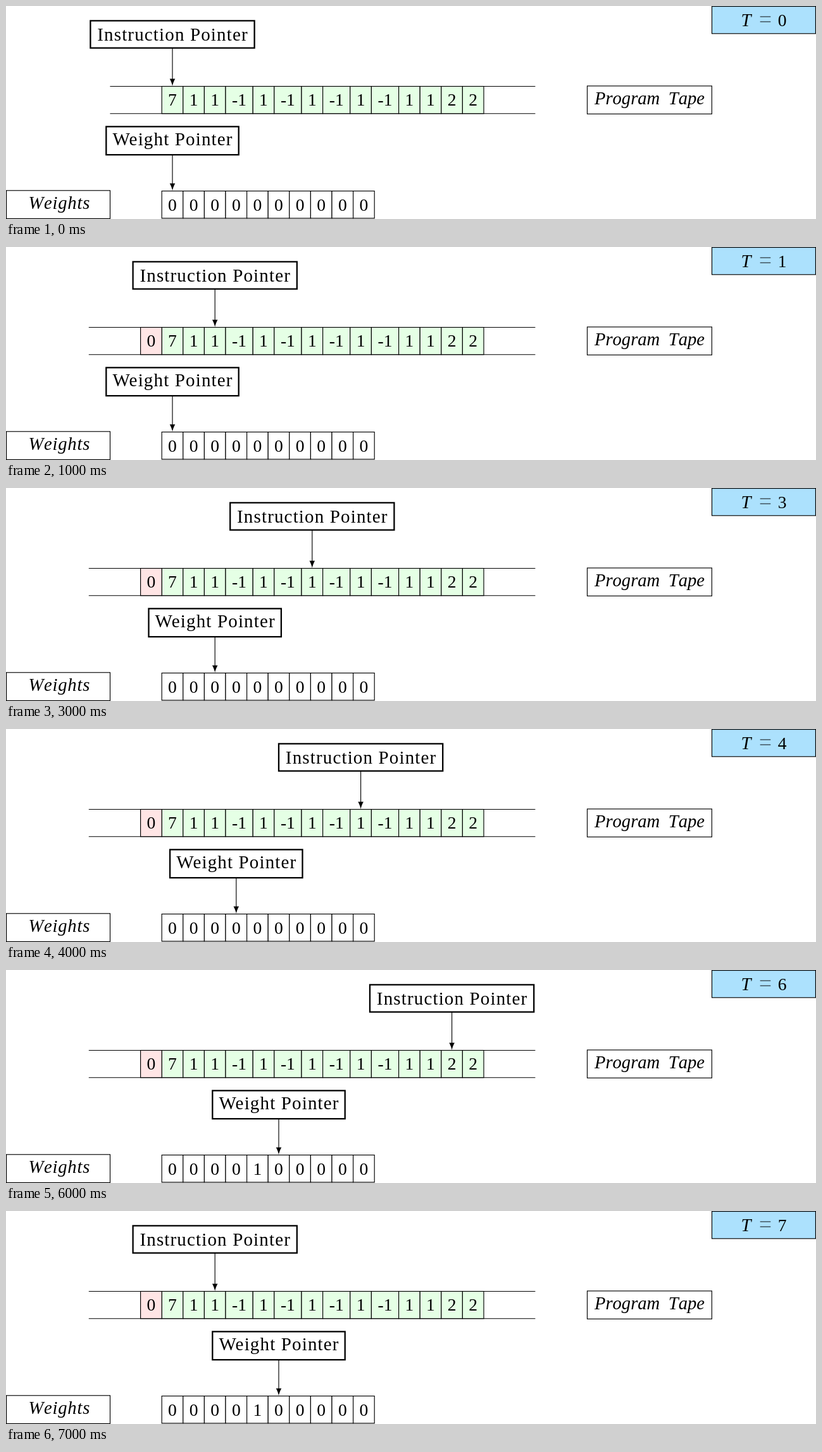
Write an HTML page that moves like this. It is 1280x338 px and loops after 8 s.

```html
<!DOCTYPE html>
<html lang="en">
<head>
<meta charset="utf-8">
<title>Program tape</title>
<style>
  html, body { margin: 0; width: 100%; height: 100%; overflow: hidden; background: #fff; }
  svg { display: block; width: 100vw; height: 100vh; }
  text { font: 27.6px "Liberation Serif", "Times New Roman", serif; text-anchor: middle; }
  .label { font-size: 29px; letter-spacing: 1.15px; }
  .it { font-size: 28.6px; font-style: italic; font-kerning: none; }
  .tape { word-spacing: 6.5px; }
  .weights { letter-spacing: 0.8px; }
  .equals { font-size: 38px; stroke: #ace1fd; stroke-width: 1px; }
  .box { stroke: #000; stroke-width: 1.15; }
  .thick { stroke: #000; stroke-width: 2.3; }
</style>
</head>
<body>
<svg id="stage" viewBox="0 0 1280 338"></svg>
<script>
const STEP = 1000, STEPS = 8;
const LEFT = 246.2, CELL = 33.6, WIDE = 43.2, HEIGHT = 43.2;
const TAPE_Y = 127.5, WEIGHTS_Y = 293.6;
const tape = [7, 1, 1, -1, 1, -1, 1, -1, 1, -1, 1, 1, 2, 2];
const stage = document.getElementById("stage");

function add(tag, attrs, parent = stage, content = "") {
  const el = document.createElementNS("http://www.w3.org/2000/svg", tag);
  for (const key in attrs) el.setAttribute(key, attrs[key]);
  el.textContent = content;
  parent.appendChild(el);
  return el;
}

const box = (x, y, width, height, fill = "#fff", parent = stage, cls = "box") =>
  add("rect", { x, y, width, height, fill, class: cls }, parent);

const label = (x, y, content, cls = "", parent = stage) =>
  add("text", { x, y, class: cls }, parent, content);

function cell(x, y, width, value, fill, parent = stage) {
  box(x, y, width, HEIGHT, fill, parent);
  return label(x + width / 2, y + HEIGHT / 2 + 9.3, value, "", parent);
}

// A captioned box with an arrow, centred on x = 0
function pointer(name, half, top, height, baseline, tip) {
  const g = add("g", {});
  add("path", { d: `M0 ${top + height}V${tip - 9}`, class: "box" }, g);
  add("path", {
    d: "M0 0C-.6 -3.1 -2.3 -8.1 -4.3 -11.5H4.3C2.3 -8.1 .6 -3.1 0 0Z",
    transform: `translate(0 ${tip})`
  }, g);
  box(-half, top, half * 2, height, "#fff", g, "thick");
  label(0.5, baseline, name, "label", g);
  return g;
}

// Clock
box(1115.5, 0.6, 163.9, HEIGHT, "#ace1fd");
label(1169.5, 32, "T", "it");
label(1200, 34.4, "=", "equals");
const clock = label(1226.6, 32, "0");

// Captions
box(918.5, 126.9, 196.9, 44.4);
label(1017, 156.3, "Program Tape", "it tape");
box(0.6, 292.8, 163.9, 44.6);
label(84.3, 322.3, "Weights", "it weights");

// Tape
const rails = add("path", { class: "box" });
const centers = [];
let x = LEFT;
for (const value of tape) {
  const w = value < 0 ? WIDE : CELL;
  cell(x, TAPE_Y, w, value, "#e5ffe5");
  centers.push(x + w / 2);
  x += w;
}
const extra = add("g", {});
cell(LEFT - CELL, TAPE_Y, CELL, 0, "#ffe5e5", extra);

// Weights
const weights = Array.from({ length: 10 }, (_, i) =>
  cell(LEFT + i * CELL, WEIGHTS_Y, CELL, 0, "#fff"));

const instruction = pointer("Instruction Pointer", 129.6, 23.4, HEIGHT, 54.8, TAPE_Y - 0.6);
const weight = pointer("Weight Pointer", 104.7, 191.4, 44.7, 221.2, WEIGHTS_Y - 0.6);

const moveTo = (el, px) => el.setAttribute("transform", `translate(${px} 0)`);

function draw(time) {
  const t = Math.floor(time / STEP) % STEPS;
  const slot = Math.min(Math.max(t - 1, 0), 5);
  const railStart = t ? 130.8 : 164.4;
  // The final instruction jumps back to address 2
  moveTo(instruction, centers[t < 7 ? t * 2 : 2]);
  moveTo(weight, LEFT + (slot + 0.5) * CELL);
  rails.setAttribute("d", [TAPE_Y, TAPE_Y + HEIGHT].map(y => `M${railStart} ${y}H836.4`).join(""));
  extra.setAttribute("visibility", t ? "visible" : "hidden");
  weights[4].textContent = t > 5 ? 1 : 0;
  clock.textContent = t;
}

const start = performance.now();
function tick() {
  draw(performance.now() - start);
  requestAnimationFrame(tick);
}
tick();
</script>
</body>
</html>
```
